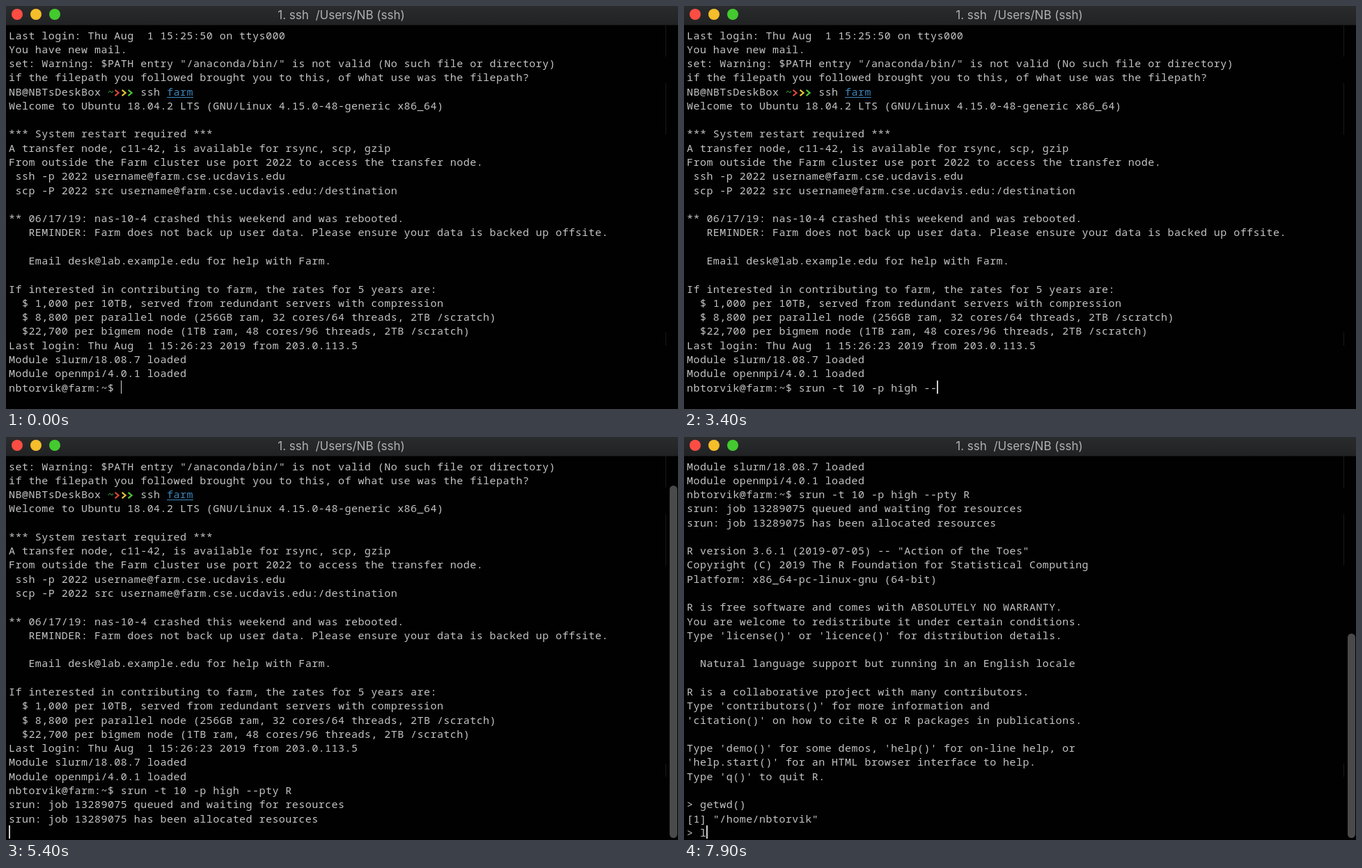
An HTML page for the animation above (8 s loop, 965 by 580 pixels).

```html
<!DOCTYPE html>
<html lang="en">
<head>
<meta charset="utf-8">
<title>Terminal</title>
<style>
  html, body { margin: 0; width: 100%; height: 100%; overflow: hidden; background: #010101; }
  #stage { position: relative; width: 965px; height: 580px; overflow: hidden; background: #010101; }
  #bar { position: absolute; inset: 0 0 auto; height: 27px; background: linear-gradient(#2a2b2d, #212224); border-bottom: 1px solid #111; }
  #bar i { position: absolute; top: 4px; width: 16px; height: 16px; border-radius: 50%; }
  #title { position: absolute; left: 0; width: 963px; top: 0; text-align: center; white-space: pre; font: 17px/26px Inter, sans-serif; color: #b0b0b1; }
  #text { position: absolute; left: 4px; top: 31.5px; margin: 0; color: #c4c4c4; font: 15px/20.28px "Noto Sans Mono", "DejaVu Sans Mono", monospace; letter-spacing: calc(9.46px - .6em); font-variant-ligatures: none; }
  #text u { color: #3b87bd; text-decoration: underline 1px; text-underline-offset: 2px; text-decoration-skip-ink: none; }
  #text svg { width: 9.46px; height: 10px; vertical-align: -1px; fill: none; stroke-width: 2.2; }
  #cursor { position: absolute; width: 1.5px; height: 19.5px; background: #cfcfcf; }
  #thumb { position: absolute; left: 953px; width: 10.5px; border-radius: 5.25px; background: #4a4a4a; }
  .edge { position: absolute; left: 947px; width: 1px; background: #191919; }
</style>
</head>
<body>
<div id="stage">
  <div class="edge" style="top:28px;height:45px"></div>
  <div class="edge" style="top:111px;height:74px"></div>
  <div class="edge" style="top:470px;height:19px"></div>
  <pre id="text"></pre>
  <div id="cursor"></div>
  <div id="thumb"></div>
  <div id="bar">
    <i style="left:8px;background:#fc4d43"></i>
    <i style="left:35px;background:#f5be2b"></i>
    <i style="left:62px;background:#44c92f"></i>
    <div id="title">1. ssh  /Users/NB (ssh)</div>
  </div>
</div>
<script>
const ROWS = 27, LINE = 20.28, CHAR = 9.46, LEFT = 4, TOP = 31.5, LOOP = 8000;

const chevron = color =>
  `<svg viewBox="0 0 9.46 10" stroke="${color}"><path d="M1.6 .8L6.6 5L1.6 9.2"/></svg>`;

const localPrompt = 'NB@NBTsDeskBox <span style="color:#3fae49">~</span>' +
  ['#d8453a', '#e3c235', '#4cc43a'].map(chevron).join('') + ' ssh <u>farm</u>';

const login = `Last login: Thu Aug  1 15:25:50 on ttys000
You have new mail.
set: Warning: $PATH entry "/anaconda/bin/" is not valid (No such file or directory)
if the filepath you followed brought you to this, of what use was the filepath?
${localPrompt}
Welcome to Ubuntu 18.04.2 LTS (GNU/Linux 4.15.0-48-generic x86_64)

*** System restart required ***
A transfer node, c11-42, is available for rsync, scp, gzip
From outside the Farm cluster use port 2022 to access the transfer node.
 ssh -p 2022 username@farm.cse.ucdavis.edu
 scp -P 2022 src username@farm.cse.ucdavis.edu:/destination

** 06/17/19: nas-10-4 crashed this weekend and was rebooted.
   REMINDER: Farm does not back up user data. Please ensure your data is backed up offsite.

   Email desk@lab.example.edu for help with Farm.

If interested in contributing to farm, the rates for 5 years are:
  $ 1,000 per 10TB, served from redundant servers with compression
  $ 8,800 per parallel node (256GB ram, 32 cores/64 threads, 2TB /scratch)
  $22,700 per bigmem node (1TB ram, 48 cores/96 threads, 2TB /scratch)
Last login: Thu Aug  1 15:26:23 2019 from 203.0.113.5
Module slurm/18.08.7 loaded
Module openmpi/4.0.1 loaded
nbtorvik@farm:~$ `;

const banner = `
R version 3.6.1 (2019-07-05) -- "Action of the Toes"
Copyright (C) 2019 The R Foundation for Statistical Computing
Platform: x86_64-pc-linux-gnu (64-bit)

R is free software and comes with ABSOLUTELY NO WARRANTY.
You are welcome to redistribute it under certain conditions.
Type 'license()' or 'licence()' for distribution details.

  Natural language support but running in an English locale

R is a collaborative project with many contributors.
Type 'contributors()' for more information and
'citation()' on how to cite R or R packages in publications.

Type 'demo()' for some demos, 'help()' for on-line help, or
'help.start()' for an HTML browser interface to help.
Type 'q()' to quit R.

> `;

// Each entry: start time, text, and ms per character (0 prints at once).
const session = [
  [0, login, 0],
  [680, 'srun -t 10 -p high --pty R', 135],
  [4200, '\n', 0],
  [4300, 'srun: job 13289075 queued and waiting for resources\n', 0],
  [4800, 'srun: job 13289075 has been allocated resources\n', 0],
  [5600, banner, 0],
  [5950, 'getwd()', 150],
  [7100, '\n[1] "/home/nbtorvik"\n> ', 0],
  [7750, 'l', 200]
];

const printed = (t, [start, text, step]) =>
  t < start ? '' : step ? text.slice(0, Math.floor((t - start) / step) + 1) : text;

const el = id => document.getElementById(id);
const text = el('text'), cursor = el('cursor').style, thumb = el('thumb').style;
let shown;

function draw(now) {
  const t = Math.floor(now % LOOP / 100) * 100;
  const lines = session.map(s => printed(t, s)).join('').split('\n');
  const scroll = Math.max(0, lines.length - ROWS);
  const html = lines.slice(scroll).join('\n');
  if (html !== shown) text.innerHTML = shown = html;

  cursor.left = LEFT + CHAR * lines.at(-1).length + 'px';
  cursor.top = TOP + LINE * (lines.length - 1 - scroll) + 'px';

  const top = 32.5 + 545 * scroll / (ROWS + scroll);
  thumb.display = scroll ? 'block' : 'none';
  thumb.top = top + 'px';
  thumb.height = 577 - top + 'px';
}

const begin = performance.now();
function tick() {
  draw(performance.now() - begin);
  requestAnimationFrame(tick);
}
tick();
</script>
</body>
</html>
```
